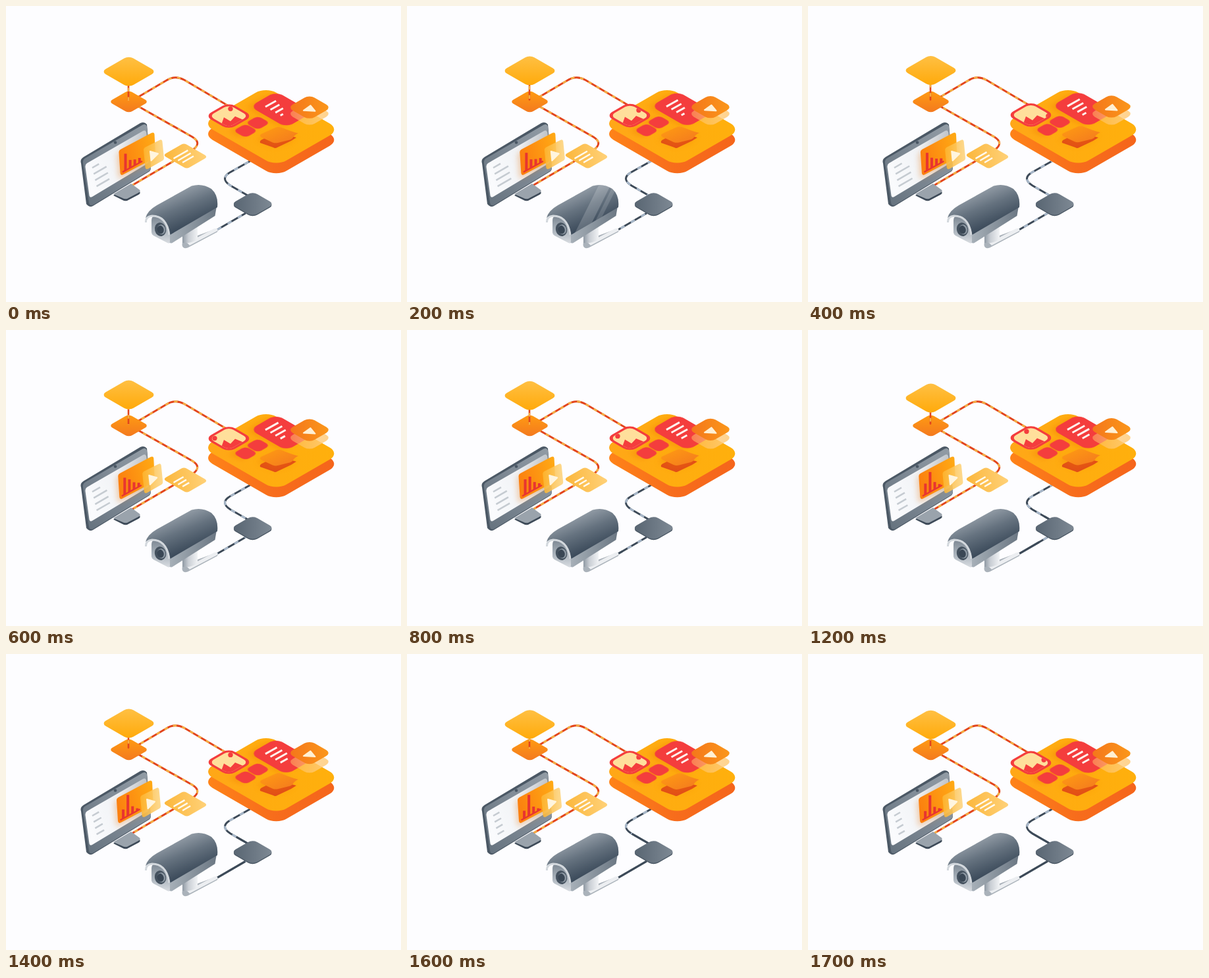
These frames come from a looping animation (600x450 px, 1.8 s). An HTML page:

```html
<!DOCTYPE html>
<html lang="en">
<head>
<meta charset="utf-8">
<title>Connected devices</title>
<style>
html,body{margin:0;width:100%;height:100%;overflow:hidden;background:#fdfdff}
svg{display:block;width:600px;height:450px}
.wire{fill:none;stroke:#e2451d;stroke-width:3;stroke-linecap:round}
.gold{fill:none;stroke:#f4b044;stroke-width:2.8;stroke-dasharray:5.5 8.5}
.steel{fill:none;stroke:#3d4a58;stroke-width:3}
.pale{fill:none;stroke:#a9b9cb;stroke-width:2.8;stroke-dasharray:7 11}
.lift{filter:drop-shadow(-3px 5px 4px rgba(236,112,0,.3))}
.red{fill:#f43d3d}
</style>
</head>
<body>
<svg viewBox="0 0 600 450" xmlns="http://www.w3.org/2000/svg">
<defs>
  <linearGradient id="sun" x2="1" y2="1"><stop stop-color="#ffc146"/><stop offset="1" stop-color="#ffa908"/></linearGradient>
  <linearGradient id="amber" x2="1" y2="1"><stop stop-color="#ff9c12"/><stop offset="1" stop-color="#f3781f"/></linearGradient>
  <linearGradient id="slab" x1="0" y1="1" x2="1" y2="0"><stop stop-color="#ffa619"/><stop offset=".4" stop-color="#ffac10"/><stop offset="1" stop-color="#ffb00c"/></linearGradient>
  <linearGradient id="base" x1="0" y1="1" x2="1" y2="0"><stop stop-color="#ff8518"/><stop offset=".5" stop-color="#f76c1c"/><stop offset="1" stop-color="#f5651b"/></linearGradient>
  <linearGradient id="play" x1="0" y1="1" x2="1" y2="0"><stop stop-color="#f4741b"/><stop offset="1" stop-color="#fb991a"/></linearGradient>
  <linearGradient id="glass" x1="0" y1="1" x2="1" y2="0"><stop stop-color="#ffc56a" stop-opacity=".45"/><stop offset="1" stop-color="#ffce80" stop-opacity=".92"/></linearGradient>
  <linearGradient id="note" x1="0" y1="1" x2="1" y2="0"><stop stop-color="#fbb63a"/><stop offset="1" stop-color="#ffd27a"/></linearGradient>
  <linearGradient id="slate" x1="0" y1="1" x2="1" y2="0"><stop stop-color="#566370"/><stop offset="1" stop-color="#808b96"/></linearGradient>
  <linearGradient id="frame" x1="0" y1="1" x2="1" y2="0"><stop stop-color="#64717d"/><stop offset=".6" stop-color="#828d98"/><stop offset="1" stop-color="#939da6"/></linearGradient>
  <linearGradient id="screen" x1="0" y1=".6" x2="1" y2=".2"><stop stop-color="#fafbfd"/><stop offset=".55" stop-color="#f0f2f5"/><stop offset="1" stop-color="#c3c9cf"/></linearGradient>
  <linearGradient id="chartFill" x1="0" y1=".6" x2="1" y2=".3"><stop stop-color="#fb7f0f"/><stop offset="1" stop-color="#ffa814"/></linearGradient>
  <linearGradient id="pane" x2="1" y2="0"><stop stop-color="#fdb52f"/><stop offset="1" stop-color="#fdd581"/></linearGradient>
  <linearGradient id="hood" x1=".3" y1=".2" x2=".65" y2=".8"><stop stop-color="#929ca6"/><stop offset=".45" stop-color="#65727f"/><stop offset="1" stop-color="#3b4a5a"/></linearGradient>
  <linearGradient id="side" x2="1" y2="0"><stop stop-color="#a9b2ba"/><stop offset="1" stop-color="#6b7783"/></linearGradient>
  <linearGradient id="face" x2="0" y2="1"><stop stop-color="#7d8893"/><stop offset=".5" stop-color="#a9b2bb"/><stop offset="1" stop-color="#d8dce1"/></linearGradient>
  <linearGradient id="post" x2="1" y2="0"><stop stop-color="#8f99a3"/><stop offset=".4" stop-color="#c9ced4"/><stop offset="1" stop-color="#f1f3f5"/></linearGradient>
  <path id="wireA" d="M198 140L243 113.500Q257 104.500 271 112.500L338 152"/>
  <path id="wireB" d="M200 152L283 199Q298 208 284 218.500L191 273"/>
  <path id="wireC" d="M374 292L341 273Q324 262 341 252.500L373 234.500"/>
  <path id="wireD" d="M321 340L364 315"/>
  <path id="hoodShape" d="M212 322Q215 311 229 303L282 273.500Q298 269 312 278Q323 288 321 306L249 348Q247 329 235 321Q222 315 212 322Z"/>
  <clipPath id="hoodClip"><use href="#hoodShape"/></clipPath>
  <clipPath id="picClip"><rect data-iso="338.500 166 34.500 34.500 8"/></clipPath>
</defs>

<!-- wires -->
<use href="#wireA" class="wire"/><use href="#wireA" class="gold"/>
<use href="#wireB" class="wire"/><use href="#wireB" class="gold"/>
<use href="#wireC" class="steel"/><use href="#wireC" class="pale"/><use href="#wireC" class="steel" id="tailC"/>
<use href="#wireD" class="steel"/><use href="#wireD" class="pale"/><use href="#wireD" class="steel" id="tailD"/>

<!-- stacked tiles -->
<rect data-iso="186.500 145.500 35 35 6" fill="url(#amber)"/>
<path class="wire" d="M186 110V142.500" style="stroke-width:2.600"/>
<path class="gold" d="M186 144V110" style="stroke-width:2.400"/>
<g id="tile"><rect data-iso="186.500 98 48.500 48.500 8" fill="url(#sun)"/></g>

<!-- monitor -->
<path d="M163 288L190 272L203 282Q205 285 201 287L184 296Q180 297 177 295Z" fill="#3d4a58"/>
<path d="M163 286L190 270L203 279.500Q205 282 201 284L184 293Q180 294 177 292Z" fill="#9aa3ac"/>
<path d="M114 239Q112 233 118 229.500L204 178Q210 175 214 180L220 246Q220 250 217 252L132 304Q127 307 122 301Z" fill="#4b5865"/>
<path d="M117 239Q116 234 121 231L207 181Q213 178 214 184L220 245Q220 249 217 251L133 302Q127 305 126 299Z" fill="url(#frame)"/>
<path d="M120.500 245Q120 241 123 239L208 190Q212 188 213 192L217 235Q217 238 215 239.500L131 290Q127 292 126.500 288Z" fill="url(#screen)"/>
<circle cx="166" cy="207.500" r="2.300" fill="#4a5764"/>
<g id="text" stroke="#c5cbd1" stroke-width="2.500"></g>
<g id="chart">
  <path class="lift" d="M171.500 223Q171 219.500 174 218L220 193.500Q225 191 225.500 195L227 226Q227 230 224 232L177.500 256.500Q174 258 173.500 254Z" fill="url(#chartFill)"/>
  <path d="M177 252.500L207 236" stroke="#e83530" stroke-width="2.500"/>
  <g id="bars" stroke="#e83530" stroke-width="4"></g>
</g>
<g id="clip">
  <path d="M209 219Q209 216 212 214.500L233 204Q237 202 237.500 206L240 231Q240 234 237 235.500L216 247.500Q212 249 211.500 245Z" fill="url(#pane)" opacity=".88"/>
  <path d="M219 221L231 224.500L220.500 235Z" fill="#fff5df" stroke="#fff5df" stroke-width="2" stroke-linejoin="round"/>
</g>

<!-- note -->
<rect data-iso="272.500 228 42 37 5" fill="url(#note)"/>
<g id="memo" stroke="#fffaf0" stroke-width="2.500"></g>

<!-- platform -->
<rect data-iso="402.700 199 130 112 18" fill="url(#base)"/>
<rect data-iso="402.700 183.300 130 112 18" fill="url(#slab)"/>
<g id="doc">
  <rect class="red lift" data-iso="418 157 64 46 12"/>
  <g id="list" stroke="#fff3ee" stroke-width="3"></g>
</g>
<rect data-iso="461 164 38.500 38.500 9" fill="url(#glass)"/>
<g id="video">
  <rect data-iso="461 151.500 38.500 38.500 9" fill="url(#play)"/>
  <path d="M452 156L462.500 148.500L469.500 157Z" fill="#fff0d4" stroke="#fff0d4" stroke-width="2" stroke-linejoin="round"/>
</g>
<path d="M386 208Q385 205 389 203L411 192L441 200L433 205L412 215Q409 217 406 215Z" fill="#e24d19"/>
<g id="bubble"><path class="lift" d="M388 196.500Q384 194 388 191.500L410 181.500Q414 180 418 181.500L431 186.500Q436 188.500 444 190.500Q438 193 436 197Q434 200 429 201L413 205Q409 206 405 204.500Z" fill="url(#amber)"/></g>
<g id="keys">
  <rect class="red lift" data-iso="382.500 175 21.500 21.500 6.500"/>
  <rect class="red lift" data-iso="363.800 187 21.500 21.500 6.500"/>
</g>
<g id="picture">
  <rect class="red" data-iso="338.500 166 42 42 11"/>
  <g clip-path="url(#picClip)">
    <path d="M300 140H380V190H300Z" fill="#ffdf9b"/>
    <circle id="disc" class="red" r="3.700"/>
    <path class="red" d="M326 182L331 168L341 174L348 166.500L366 174L340 190Z"/>
  </g>
</g>

<!-- gray tile -->
<rect data-iso="374.700 302.500 38 38 8" fill="#4a5764"/>
<rect data-iso="374.700 301 38 38 8" fill="url(#slate)"/>

<!-- camera -->
<path d="M268 359L291 349L318 339Q323 339 321 343.500L276 367.500Q268 370 267.500 363Z" fill="#aab2ba"/>
<path d="M275 360L316 338.500Q323 337 321 342L279 364Z" fill="#eceef1"/>
<path d="M268 346L291 334V354Q281 362 268 360Z" fill="url(#post)"/>
<path d="M248 340L320 304L317.500 319L252 360.500Q248 361 246 358Z" fill="url(#side)"/>
<path d="M221 326Q221 318 230 320Q246 326 249 343V358Q249 362 245 360L224 349Q221 347 221 344Z" fill="url(#face)"/>
<g transform="rotate(-14 235 339.500)">
  <ellipse cx="234.500" cy="339.500" rx="8.500" ry="10.500" fill="#45525f"/>
  <ellipse cx="236" cy="340" rx="6" ry="7.500" fill="#8c97a2"/>
  <ellipse cx="234.500" cy="340" rx="5" ry="6.300" fill="#3a4755"/>
</g>
<use href="#hoodShape" fill="url(#hood)"/>
<g clip-path="url(#hoodClip)"><g id="shine" fill="#fff">
  <path d="M295 265H313L273 345H255Z" opacity=".18"/>
  <path d="M317 265H324L284 345H277Z" opacity=".14"/>
</g></g>
<path d="M212.500 329Q212 320 222 319Q244 319 248 348" fill="none" stroke="#d3d8dd" stroke-width="3"/>
</svg>
<script>
const LOOP = 1800, STEP = 100, HALF = 1500;
const $ = id => document.getElementById(id);
const all = css => document.querySelectorAll(css);

for (const r of all('[data-iso]')) {
  const [x, y, w, h, rx] = r.dataset.iso.split(' ').map(Number);
  const attrs = { x: -w / 2, y: -h / 2, width: w, height: h, rx, transform: `matrix(.866 .5 -.866 .5 ${x} ${y})` };
  for (const k in attrs) r.setAttribute(k, attrs[k]);
}

// Zero at time `rest`, rising to twice `amp` half a period later.
const wave = (t, rest, amp) => amp * (1 - Math.cos(Math.PI * (t - rest) / HALF));
const move = (id, x, y) => $(id).setAttribute('transform', `translate(${x} ${y})`);

// Adds `count` strokes whose start and length come from rules.
const strokes = [];
function addStrokes(id, count, slope, start, length) {
  for (let i = 0; i < count; i++) {
    const el = document.createElementNS('http://www.w3.org/2000/svg', 'path');
    $(id).append(el);
    strokes.push(t => {
      const n = length(t, i);
      const step = slope ? `${n} ${slope * n}` : `0 ${-n}`;
      el.setAttribute('d', `M${start(i)}l${step}`);
    });
  }
}
addStrokes('text', 4, -.58, i => [131 + 2.2 * i, 246 + 9.4 * i],
  (t, i) => i ? 21 - wave(t, 350, 6) : 12 - wave(t, 700, 2));
addStrokes('memo', 3, -.58, i => [254.5 + 6.8 * i, 232 + 3 * i],
  (t, i) => 14 - 2.5 * i + wave(t, 900, 6));
addStrokes('list', 4, -.56, i => [394 + 7.6 * i, 153 + 4.4 * i],
  (t, i) => (i < 3 ? 20 - i : 11) - wave(t, 800 + 200 * i, 3.5));
// Bars: longest length, swing, time of the peak.
const bars = [[27, 8, 300], [32, 10, 1500], [11, 1.5, 1000], [7, 1.8, 0]];
addStrokes('bars', bars.length, 0, i => [181.5 + 7.1 * i, 250 - 4 * i],
  (t, i) => bars[i][0] - wave(t, bars[i][2], bars[i][1]));

// Hides the pale dashes on the first part of a wire.
function tail(id, len) {
  const s = $(id).style;
  s.strokeDasharray = `${len} 500`;
  s.visibility = len > 0 ? 'visible' : 'hidden';
}

// The disc crosses the picture along an arc.
function moveDisc(t) {
  const p = (t < 450 ? t + 1400 : t) - 600;
  const x = 317 + .01 * p + .000025 * p * p;
  move('disc', x, 155 + .02 * (x - 340) ** 2);
}

function draw(t) {
  move('tile', 0, wave(t, 400, 5));
  move('chart', -wave(t, 0, 1.75), 0);
  move('clip', -wave(t, 0, 2.5), 0);
  move('doc', 0, wave(t, 1000, 1.2) - 1.5);
  move('video', 0, wave(t, 1250, 2) - 1);
  move('bubble', 0, wave(t, 1200, 1.6));
  move('keys', 0, wave(t, 1000, 1.8));
  move('picture', 0, wave(t, 1100, 2) - 2);
  moveDisc(t);
  for (const update of strokes) update(t);

  move('shine', (t - 200) * .27, 0);
  $('shine').style.opacity = t >= 100 && t < 500 ? 1 : 0;

  for (const el of all('.gold')) el.style.strokeDashoffset = -28 * t / LOOP;
  for (const el of all('.pale')) el.style.strokeDashoffset = -36 * t / LOOP;
  tail('tailD', Math.min(50, (t - 700) * .07));
  tail('tailC', (t - 850) * .05);
}

function tick(now) {
  draw(Math.floor(now % LOOP / STEP) * STEP);
  requestAnimationFrame(tick);
}
draw(0);
requestAnimationFrame(tick);
</script>
</body>
</html>
```
